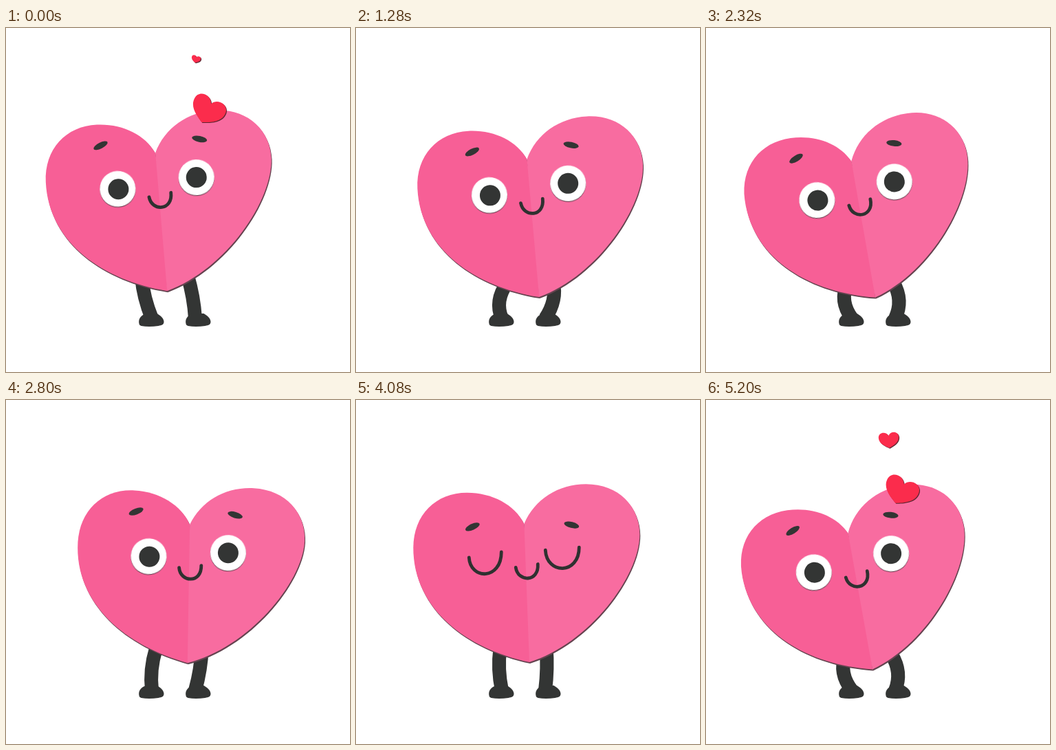
Write an HTML page that moves like this. It is 500x500 px and loops after 5280 ms.

```html
<!DOCTYPE html>
<html lang="en">
<head>
<meta charset="utf-8">
<title>Dancing heart</title>
<style>
  html, body { margin: 0; width: 100%; height: 100%; overflow: hidden; background: #fff; }
  svg { display: block; width: 100%; height: 100%; }
  .ink { fill: #333534; }
  .line { fill: none; stroke: #2f3130; stroke-width: 4.8; stroke-linecap: round; }
  .leg { fill: none; stroke: #333534; stroke-width: 20; }
  .paper { filter: drop-shadow(1.5px 2.2px 0 #64434f); }
  .eye { filter: drop-shadow(.8px 1px 0 #5a3544); }
  .love { fill: #fb2c4c; filter: drop-shadow(1.3px 1.8px 0 #5c2530); }
</style>
</head>
<body>
<svg viewBox="0 0 500 500">
  <defs>
    <path id="shoe" d="M-17 10 C-19 2 -13 -3 -7 -5 H9 C14 -2 19 2 19 7 C19 11 16 12 11 13 Q-3 15 -14 13 Q-17 12 -17 10Z"/>
    <path id="love" d="M0 -9 C-5 -21 -25 -20 -25 -5 C-25 9 -10 16 0 21 C10 16 25 9 25 -5 C25 -20 5 -21 0 -9Z"/>
  </defs>
  <path class="leg" id="legL"/>
  <path class="leg" id="legR"/>
  <use class="ink" href="#shoe" x="210.5" y="420"/>
  <use class="ink" href="#shoe" x="278.5" y="420"/>
  <g class="paper">
    <g id="body">
      <path fill="#f75f96" d="M-8 -201 C-22 -229 -55 -246 -91 -246 C-136 -246 -169 -214 -169 -166 C-169 -77 -91 -19 0 0 L2 -100Z"/>
      <path fill="#f86ca0" d="M-8 -201 C7 -237 42 -259 82 -259 C129 -259 160 -227 160 -186 C160 -125 87 -27 0 0Z"/>
    </g>
  </g>
  <g id="face">
    <g id="open">
      <g class="eye"><circle cx="-65" cy="-151.5" r="26" fill="#fff"/></g>
      <g class="eye"><circle cx="50" cy="-163" r="26" fill="#fff"/></g>
      <circle class="ink" cx="-64" cy="-151" r="15"/>
      <circle class="ink" cx="50" cy="-163" r="15"/>
    </g>
    <g id="closed" class="line">
      <path d="M-88 -152 C-86 -119 -41 -119 -41 -160"/>
      <path d="M23 -163 C25 -127 72 -127 72 -167"/>
    </g>
    <path class="line" d="M-20 -137.5 C-17 -116 14 -116 12 -142.5"/>
    <g id="brows" class="ink">
      <ellipse rx="11.2" ry="4.4" transform="translate(-87 -215.5) rotate(-24)"/>
      <ellipse rx="11.2" ry="4.4" transform="translate(57 -218.5) rotate(14)"/>
    </g>
  </g>
  <g class="love"><use id="love0" href="#love"/></g>
  <g class="love"><use id="love1" href="#love"/></g>
</svg>
<script>
const LOOP = 5280, STEP = 80, SWAY = 805, SWAY_START = -88, DANCE_END = 3200;
const $ = id => document.getElementById(id);
const clamp = v => Math.max(0, Math.min(1, v));
const ramp = (t, a, b) => { const u = clamp((t - a) / (b - a)); return u * u * (3 - 2 * u); };
const rad = Math.PI / 180;

// A pose is the tip of the heart and its lean in degrees: [x, y, lean]
function dance(t) {
  const p = 2 * Math.PI * (t - SWAY_START) / SWAY;
  const settle = 4 * clamp(1 - t / 400);
  return [
    251.5 - 6.2 * Math.cos(p) - 13.4 * Math.sin(p) - settle,
    394.6 - 4.3 * Math.cos(2 * p) - 11.8 * Math.sin(2 * p),
    2.65 + 8.75 * Math.cos(p + 35 * rad)
  ];
}

const keys = [
  [3120, ...dance(3120)], [3200, ...dance(3200)],
  [3280, 239, 372, 4.2], [3360, 243, 376, 2.5], [3520, 250.5, 380, 2.3],
  [3680, 252, 381, 2.3], [4480, 252, 381, 2.3], [4800, 253, 389, 5],
  [5040, 251, 403, 9.9], [5200, 242, 391.5, 10.3], [5280, ...dance(0)]
];

function slope(i, c) {
  const a = keys[Math.max(0, i - 1)], b = keys[Math.min(keys.length - 1, i + 1)], k = keys[i];
  const before = k[c] - a[c], after = b[c] - k[c];
  return before * after <= 0 ? 0 : (b[c] - a[c]) / (b[0] - a[0]);
}

function settleAndRestart(t) {
  let i = 0;
  while (i < keys.length - 2 && t >= keys[i + 1][0]) i++;
  const a = keys[i], b = keys[i + 1], d = b[0] - a[0], u = (t - a[0]) / d;
  const ease = u * u * (3 - 2 * u);
  return [1, 2, 3].map(c =>
    a[c] + (b[c] - a[c]) * ease
    + d * (u * (1 - u) ** 2 * slope(i, c) - u * u * (1 - u) * slope(i + 1, c)));
}

// A leg of fixed length bows outwards as the hip sinks
function drawLeg(el, hipX, hipY, footX, side) {
  const footY = 422, dist = Math.hypot(footX - hipX, footY - hipY);
  const bow = .0085 * Math.max(0, 66 ** 2 - dist ** 2);
  const kneeX = (hipX + footX) / 2 + side * bow, kneeY = (hipY + footY) / 2;
  el.setAttribute('d', `M${hipX} ${hipY} Q${kneeX} ${kneeY} ${footX} ${footY}`);
}

function drawLove(el, age) {
  const size = age < 230 ? 0 : Math.min(clamp((age - 230) / 160), clamp((1087 - age) / 250));
  const p = 2 * Math.PI * (age - 440) / 600;
  const x = 279.5 + 16 * Math.sin(p), y = 203 - .155 * age;
  const turn = 4 + 24 * Math.sin(p + 42 * rad);
  el.setAttribute('transform', `translate(${x} ${y}) rotate(${turn}) scale(${size})`);
  el.style.display = size > 0 ? '' : 'none';
}

function draw(t) {
  const [x, y, lean] = t < DANCE_END ? dance(t) : settleAndRestart(t);
  const place = `translate(${x} ${y}) rotate(${2.4 - lean})`;
  $('body').setAttribute('transform', place);
  $('face').setAttribute('transform', place);

  const shift = .7 * (x - 252);
  drawLeg($('legL'), 209.5 + shift, y - 20, 212, -1);
  drawLeg($('legR'), 276.5 + shift, y - 22, 275, 1);

  const asleep = t >= 3600 && t < 4560;
  $('open').style.display = asleep ? 'none' : '';
  $('closed').style.display = asleep ? '' : 'none';
  const frown = ramp(t, 3440, 3680) - ramp(t, 4460, 4660);
  $('brows').setAttribute('transform', `translate(${4 * frown} ${19 * frown})`);

  const late = t < 1200 ? t + LOOP : t;
  drawLove($('love0'), late - 4260);
  drawLove($('love1'), late - 4733);
}

const start = performance.now();
function tick() {
  const t = (performance.now() - start) % LOOP;
  draw(Math.floor(t / STEP) * STEP);
  requestAnimationFrame(tick);
}
tick();
</script>
</body>
</html>
```
